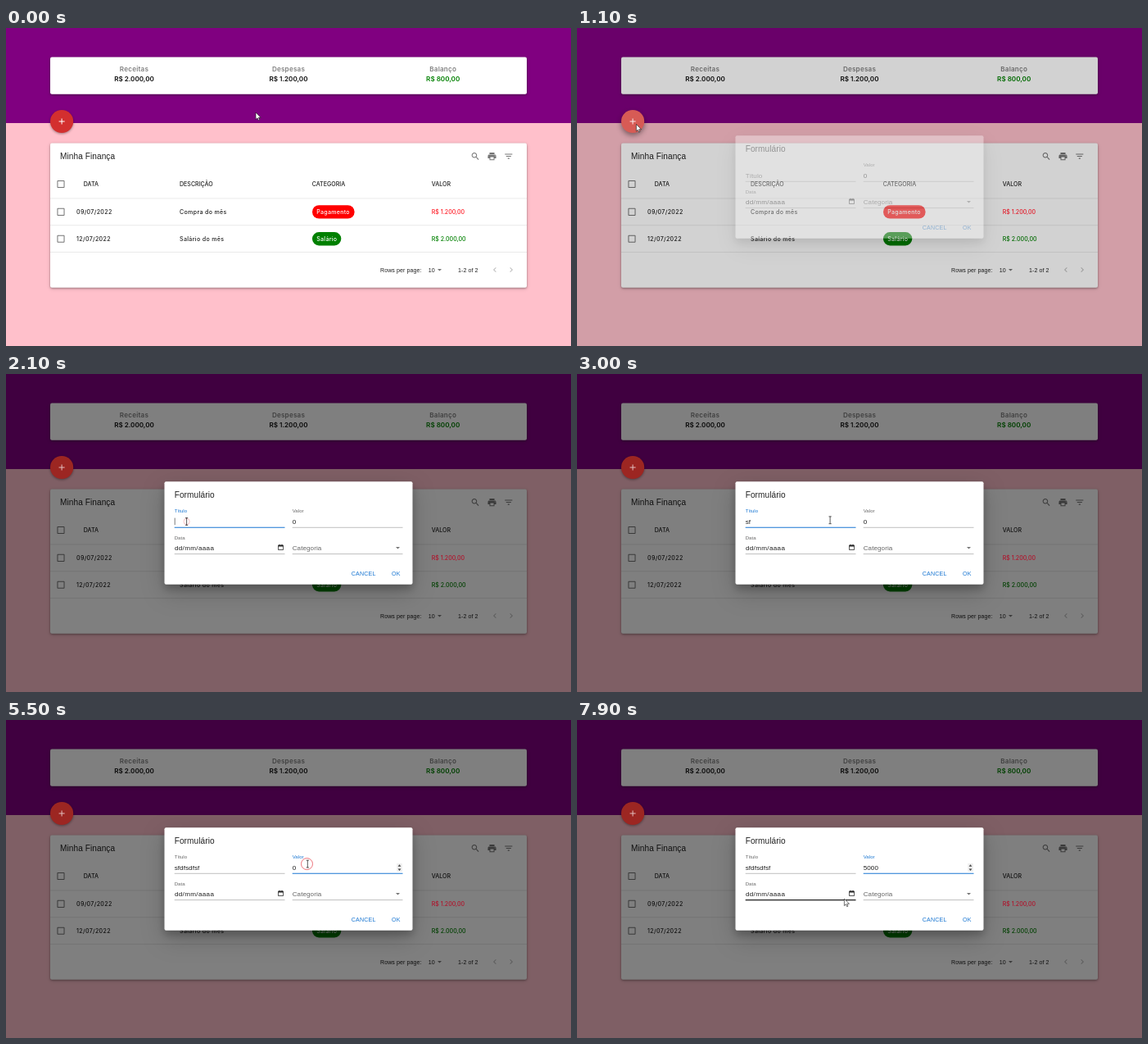
Recreate the animation shown at these times as an HTML page. Size 690 by 388 pixels, loop 8 s.

```html
<!DOCTYPE html>
<html lang="pt-BR">
<head>
<meta charset="utf-8">
<title>Minha Finança</title>
<style>
html, body { margin: 0; width: 100%; height: 100%; overflow: hidden; background: #ffc0cb; }
svg { display: block; width: 690px; height: 388px; }
text { font: 7.07px "Liberation Sans", Arial, sans-serif; letter-spacing: .075px; fill: #212121; white-space: pre; }
.geo { font: 500 7.07px Inter, "Open Sans", sans-serif; letter-spacing: 0; }
.wide { letter-spacing: .33px; }
.chip { fill: #fff; letter-spacing: .28px; }
.sum { font-weight: 600; font-size: 8.08px; text-anchor: middle; }
.cap { fill: #808080; letter-spacing: .23px; }
.title { font-size: 10.1px; }
.input { font-size: 8.08px; }
.date { letter-spacing: .35px; }
.label { font-size: 6.06px; letter-spacing: .05px; fill: #666; }
.btn { fill: #1976d2; letter-spacing: .2px; }
.paper { fill: #fff; filter: drop-shadow(0 1px 1px rgba(0,0,0,.3)) drop-shadow(0 1px 2px rgba(0,0,0,.16)); }
.modal { fill: #fff; filter: drop-shadow(0 5px 5px rgba(0,0,0,.22)) drop-shadow(0 9px 14px rgba(0,0,0,.2)); }
.rule { stroke: #dcdcdc; stroke-width: .6; }
</style>
</head>
<body>
<svg id="stage" viewBox="0 0 690 388" xmlns="http://www.w3.org/2000/svg"></svg>
<script>
const LOOP = 8000, TICK = 100;
const BLUE = '#1976d2';
const ICON = {
  search: 'M15.5 14h-.79l-.28-.27C15.41 12.59 16 11.11 16 9.5 16 5.91 13.09 3 9.5 3S3 5.91 3 9.5 5.91 16 9.5 16c1.61 0 3.09-.59 4.23-1.57l.27.28v.79l5 4.99L20.49 19l-4.99-5zm-6 0C7.01 14 5 11.99 5 9.5S7.01 5 9.5 5 14 7.01 14 9.5 11.99 14 9.5 14z',
  print: 'M19 8H5c-1.66 0-3 1.34-3 3v6h4v4h12v-4h4v-6c0-1.66-1.34-3-3-3zm-3 11H8v-5h8v5zm3-7c-.55 0-1-.45-1-1s.45-1 1-1 1 .45 1 1-.45 1-1 1zm-1-9H6v4h12V3z',
  filter: 'M10 18h4v-2h-4v2zM3 6v2h18V6H3zm3 7h12v-2H6v2z',
  box: 'M19 5v14H5V5h14m0-2H5c-1.1 0-2 .9-2 2v14c0 1.1.9 2 2 2h14c1.1 0 2-.9 2-2V5c0-1.1-.9-2-2-2z',
  add: 'M19 13h-6v6h-2v-6H5v-2h6V5h2v6h6v2z',
  left: 'M15.41 7.41L14 6l-6 6 6 6 1.41-1.41L10.83 12z',
  right: 'M10 6L8.59 7.41 13.17 12l-4.58 4.59L10 18l6-6z',
  down: 'M7 10l5 5 5-5z',
  date: 'M5 4h2V2h2v2h6V2h2v2h2c1 0 2 1 2 2v13c0 1-1 2-2 2H5c-1 0-2-1-2-2V6c0-1 1-2 2-2zm0 5v10h14V9z'
};

const text = (x, y, cls, s, extra = '') => `<text x="${x}" y="${y}" class="${cls}" ${extra}>${s}</text>`;
const icon = (name, x, y, color = '#757575', size = 12.1) =>
  `<path d="${ICON[name]}" fill="${color}" transform="translate(${x} ${y}) scale(${size / 24}) translate(-12 -12)"/>`;
const rect = (x, y, w, h, extra) => `<rect x="${x}" y="${y}" width="${w}" height="${h}" ${extra}/>`;
const rule = y => `<path class="rule" d="M54 ${y}H636"/>`;
const total = (x, name, value, color) =>
  text(x, 52.6, 'geo sum cap', name) + text(x, 65.1, 'geo sum', value, `style="fill:${color}"`);
const row = (y, date, name, tag, width, color) =>
  icon('box', 67, y) + text(86, y + 2.5, 'geo wide', date) + text(212, y + 2.5, 'geo wide', name) +
  rect(374, y - 8.2, width, 16.4, `rx="8.2" fill="${color}"`) + text(379.2, y + 2.5, 'geo chip', tag);
const line = (id, x, y) => `<path id="${id}" d="M${x} ${y}h134.8" fill="none"/>`;

document.getElementById('stage').innerHTML =
  rect(0, 0, 690, 388, 'fill="#ffc0cb"') + rect(0, 0, 690, 116, 'fill="#800080"') +
  rect(54, 35.5, 582, 45.3, 'rx="2" class="paper"') +
  total(156.5, 'Receitas', 'R$ 2.000,00', '#111') +
  total(345, 'Despesas', 'R$ 1.200,00', '#111') +
  total(533.7, 'Balanço', 'R$ 800,00', 'green') +
  rect(54, 140.4, 582, 176.4, 'rx="2" class="paper"') +
  text(66, 160.2, 'title', 'Minha Finança') +
  icon('search', 573.2, 156.6) + icon('print', 593.5, 156.6) + icon('filter', 613.8, 156.6) +
  icon('box', 67, 190.5) + text(94.7, 192.5, 'geo', 'DATA') + text(212, 193, 'geo', 'DESCRIÇÃO') +
  text(373.7, 193, 'geo', 'CATEGORIA') + text(519.7, 193, 'geo', 'VALOR') +
  rule(208) + rule(240.7) + rule(273.5) +
  row(224.4, '09/07/2022', 'Compra do mês', 'Pagamento', 51.6, 'red') +
  row(257.2, '12/07/2022', 'Salário do mês', 'Salário', 35.3, 'green') +
  text(519.7, 259.7, 'geo', 'R$ 2.000,00', 'style="fill:green"') +
  text(457, 297.6, '', 'Rows per page:') + text(515.7, 297.6, '', '10') + icon('down', 529.5, 295) +
  text(552, 297.6, '', '1-2 of 2') + icon('left', 597, 295, '#bdbdbd') + icon('right', 617, 295, '#bdbdbd') +
  rect(0, 0, 690, 388, 'id="shade" fill="#000"') +
  text(519.7, 226.9, 'geo', 'R$ 1.200,00', 'id="cost"') +
  '<circle id="fab" cx="68.1" cy="114" r="14.1"/>' +
  `<g id="plus">${icon('add', 68.1, 114, '#fff')}</g>` +
  '<g id="dialog">' +
    rect(193.5, 131.3, 303, 125.4, 'rx="2" class="modal"') +
    text(205.7, 151, 'title', 'Formulário') +
    '<text id="nameLabel" class="label">Título</text>' + text(205.7, 182.7, 'input', '', 'id="name"') +
    line('nameLine', 205.7, 187.3) +
    text(349.7, 169, 'label', 'Valor', 'id="sumLabel"') + text(349.7, 182.7, 'input', '', 'id="sum"') +
    line('sumLine', 349.7, 187.3) +
    '<g id="spin">' + rect(477.2, 175, 6.6, 10, 'fill="#efefef"') +
      '<path d="M478.6 178.7l1.9-2.4 1.9 2.4zM478.6 181.5l1.9 2.4 1.9-2.4z" fill="#444"/></g>' +
    text(205.7, 201.6, 'label', 'Data') + text(205.9, 214.8, 'input date', 'dd/mm/aaaa') +
    icon('date', 335.5, 211.6, '#222', 9) + line('dateLine', 205.7, 219.6) +
    text(349.7, 214.8, 'input', 'Categoria', 'style="fill:#666"') + icon('down', 478.5, 212) +
    line('kindLine', 349.7, 219.6) +
    text(421.8, 246.1, 'btn', 'CANCEL') + text(471, 246.1, 'btn', 'OK') +
    '<path id="caret" d="M206.2 175.6v8.6" stroke="#222" stroke-width=".6"/>' +
  '</g>' +
  '<circle id="click" fill="none" stroke="#e8505a" stroke-width=".9"/>' +
  '<g id="cursor">' +
    '<path id="arrow" d="M0 0V8.6L2 6.8 3.3 9.7 4.6 9.1 3.4 6.3H6.1Z" fill="#fff" stroke="#111" stroke-width=".6"/>' +
    '<path id="hand" d="M0 5.4V.6a.9.9 0 0 1 1.8 0V3.8l3.6.8c.8.2 1.1.7 1 1.4L5.8 10.6H1.6L-1.6 6.6c-.4-.9.6-1.6 1.6-.6Z" fill="#fff" stroke="#111" stroke-width=".7"/>' +
    '<path id="beam" d="M-1.6-4.4H1.6M0-4.4V4.4M-1.6 4.4H1.6" fill="none" stroke="#222" stroke-width=".75"/>' +
  '</g>';

const $ = {};
document.querySelectorAll('[id]').forEach(e => $[e.id] = e);
const set = (e, attrs) => { for (const k in attrs) e.setAttribute(k, attrs[k]); };
const show = (e, on) => e.setAttribute('visibility', on ? 'visible' : 'hidden');
const clamp = v => Math.max(0, Math.min(1, v));
const lerp = (a, b, k) => a + (b - a) * k;
const smooth = v => { v = clamp(v); return v * v * (3 - 2 * v); };
const mix = (a, b, k) => `rgb(${a.map((v, i) => Math.round(lerp(v, b[i], k)))})`;

// time, x, y of the pointer
const PATH = [
  [0, 305, 103], [400, 382, 180], [900, 71, 118.5], [1000, 70.6, 118], [1100, 72.4, 117.4],
  [1800, 222, 181], [1900, 220.6, 180], [2300, 220.6, 180], [2700, 309, 178.3], [4200, 310, 178.3],
  [4800, 372, 178], [5100, 371, 177], [5400, 368.3, 175.6], [7400, 368.3, 175.6], [7800, 326.4, 218], [8000, 326.4, 218]
];
const CLICKS = [[1900, 220.6, 180], [4900, 371.5, 177.5], [5500, 367.5, 175.6]];

function pointer(t) {
  const i = Math.max(1, PATH.findIndex(p => p[0] >= t));
  const a = PATH[i - 1], b = PATH[i], k = smooth((t - a[0]) / (b[0] - a[0]));
  return [lerp(a[1], b[1], k), lerp(a[2], b[2], k)];
}

function underline(e, color, strong) {
  set(e, { stroke: color, 'stroke-width': strong ? 1.1 : .6 });
}

function draw(t) {
  const [x, y] = pointer(t);
  const open = smooth((t - 1010) / 225);
  const nameOn = t >= 1900 && t < 4900, sumOn = t >= 4900;

  set($.shade, { opacity: open * .5 });
  set($.dialog, { opacity: open });
  $.cost.style.fill = mix([255, 30, 40], [176, 20, 44], open);

  const overFab = t < 1300 && Math.hypot(x - 68.1, y - 114) < 14;
  const lit = t >= 1000 ? 1 - smooth((t - 1050) / 350) : 0;
  const base = overFab && t < 1000 ? [198, 40, 40] : [211, 47, 47];
  const face = base.map((v, i) => lerp(v, [156, 38, 34][i], open));
  $.fab.style.fill = mix(face, [216, 94, 87], lit);
  $.fab.style.filter = overFab
    ? 'drop-shadow(0 3px 3px rgba(0,0,0,.42))'
    : 'drop-shadow(0 1.8px 1.8px rgba(0,0,0,.38))';
  set($.plus, { opacity: 1 - open * .3 });

  const lift = smooth((t - 1880) / 200);
  set($.nameLabel, {
    transform: `translate(205.7 ${lerp(182.7, 169, lift)}) scale(${lerp(4 / 3, 1, lift)})`
  });
  $.nameLabel.style.fill = nameOn ? BLUE : '#666';
  $.sumLabel.style.fill = sumOn ? BLUE : '#666';
  $.name.textContent = 'sfdfsdfsf'.slice(0, clamp((t - 2800) / 900) * 9 + .01);
  $.sum.textContent = t < 6100 ? '0' : t < 6700 ? '50' : t < 7000 ? '500' : '5000';
  show($.caret, nameOn && t < 2800 && (t - 1900) % 1000 < 500);
  show($.spin, sumOn);

  const overDate = t > 7400 && y > 194;
  underline($.nameLine, nameOn ? BLUE : '#949494', nameOn);
  underline($.sumLine, sumOn ? BLUE : '#949494', sumOn);
  underline($.dateLine, overDate ? '#212121' : '#949494', overDate);
  underline($.kindLine, '#949494', false);

  const hit = CLICKS.find(c => t >= c[0] && t < c[0] + 300);
  show($.click, hit);
  if (hit) {
    const age = (t - hit[0]) / 300;
    set($.click, { cx: hit[1], cy: hit[2], r: 7 - age * 5, opacity: .9 - age * .8 });
  }

  const inField = t > 1300 && y > 171 && y < 188 && (x > 205 && x < 341 || x > 349 && x < 485);
  set($.cursor, { transform: `translate(${x} ${y})` });
  show($.hand, overFab && t <= 1000);
  show($.beam, inField);
  show($.arrow, !inField && !(overFab && t <= 1000));
}

function frame() {
  const t = performance.now() % LOOP;
  draw(Math.floor(t / TICK) * TICK);
  requestAnimationFrame(frame);
}
frame();
</script>
</body>
</html>
```
